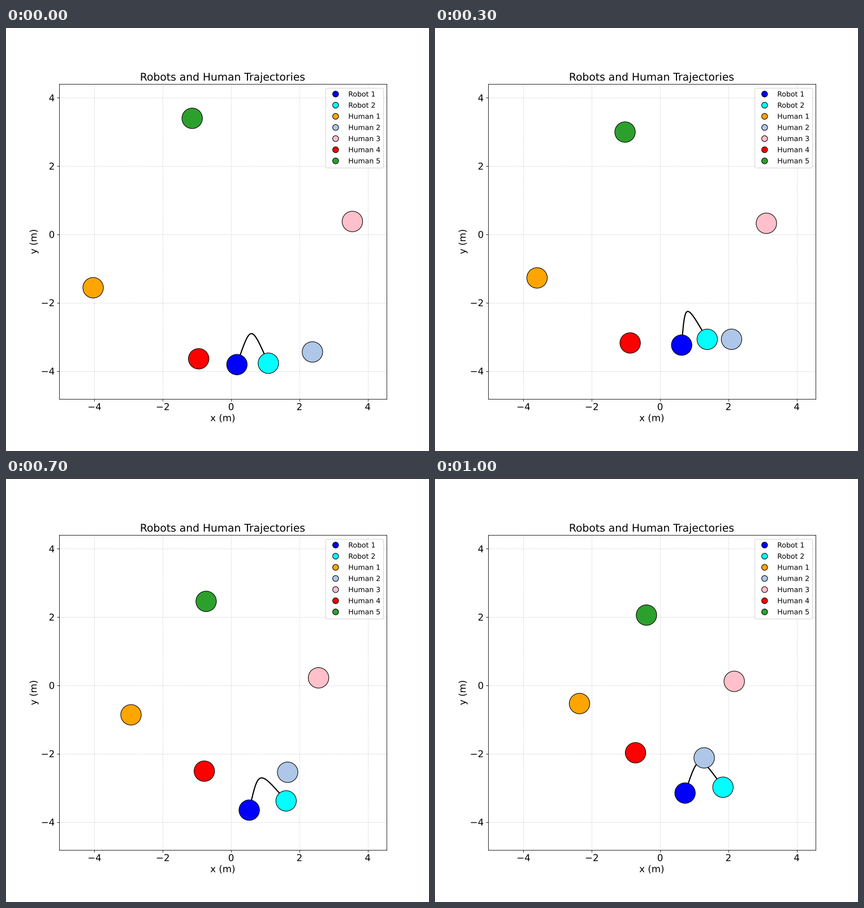
Recreate the animation shown at these times as a matplotlib script. Size 748 by 748 pixels, loop 1100 ms.

```python
import numpy as np
import matplotlib.pyplot as plt
from matplotlib.animation import FuncAnimation
from matplotlib.patches import Circle, FancyBboxPatch
from matplotlib.patheffects import Normal
from matplotlib.text import Text
from matplotlib.transforms import IdentityTransform

SIZE, DPI = 748, 74.8
STEPS, INTERVAL = 11, 100
RADIUS = 0.3
REACH = 1.0  # distance from each robot to the top of the rope

plt.rcParams["font.family"] = "DejaVu Sans"
plt.rcParams["text.hinting"] = "none"

# Robots drive straight between turning points (step, x, y).
ROBOTS = {
    "Robot 1": ("blue", [(0, 0.17, -3.81), (3, 0.63, -3.24), (5, 0.53, -3.72),
                         (7, 0.53, -3.65), (10, 0.73, -3.15)]),
    "Robot 2": ("cyan", [(0, 1.09, -3.77), (3, 1.38, -3.07), (5, 1.29, -3.06),
                         (7, 1.61, -3.38), (8, 1.84, -3.48), (10, 1.84, -2.98)]),
}

# Humans walk a gentle curve through start, halfway point and end.
HUMANS = {
    "Human 1": ("orange", [(-4.04, -1.56), (-3.28, -1.07), (-2.36, -0.53)]),
    "Human 2": ("#aec7e8", [(2.38, -3.44), (1.88, -2.81), (1.29, -2.12)]),
    "Human 3": ("pink", [(3.55, 0.38), (2.83, 0.28), (2.17, 0.12)]),
    "Human 4": ("red", [(-0.95, -3.64), (-0.83, -2.85), (-0.72, -1.97)]),
    "Human 5": ("#2ca02c", [(-1.14, 3.40), (-0.90, 2.73), (-0.40, 2.06)]),
}
COLORS = {name: color for name, (color, _) in {**ROBOTS, **HUMANS}.items()}


def drive(turns, step):
    t, x, y = np.transpose(turns)
    return np.array([np.interp(step, t, x), np.interp(step, t, y)])


def walk(points, step):
    s = step / (STEPS - 1)
    weights = [(1 - 2 * s) * (1 - s), 4 * s * (1 - s), s * (2 * s - 1)]
    return np.dot(weights, points)


def rope_curve(p, q, n=80):
    """Cubic Bezier with merged handles; its top is REACH from both ends."""
    chord = q - p
    span = np.hypot(*chord)
    height = np.sqrt(max(REACH**2 - (span / 2)**2, 0))
    normal = np.array([-chord[1], chord[0]]) / span
    w = np.linspace(-0.5, 0.5, n)
    return (((p + q) / 2)[:, None] + np.outer(chord, w * (0.75 + w**2))
            + np.outer(normal, height * (1 - 4 * w**2)))


def draw_legend(ax):
    em = 12 * DPI / 72
    px = IdentityTransform()
    left, right, top, bottom = 565.4, 667, 105.6, 247.2
    ax.add_artist(FancyBboxPatch(
        (left, SIZE - bottom), right - left, bottom - top,
        boxstyle="round,pad=0,rounding_size=0.2", mutation_scale=em,
        fc="white", ec="0.8", alpha=0.8, transform=px, snap=True, zorder=5))
    for i, (name, color) in enumerate(COLORS.items()):
        base = SIZE - 121.2 - 19.69 * i
        ax.add_artist(Circle((left + 1.4 * em, base + 0.35 * em), 5 * DPI / 72,
                             fc=color, ec="black", transform=px, zorder=6))
        ax.text(left + 3.2 * em, base, name, fontsize=12, transform=px, zorder=6)


fig, ax = plt.subplots(figsize=(SIZE / DPI, SIZE / DPI), dpi=DPI)
ax.set_aspect("equal")
ax.set_xlim(-5.043, 4.555)
ax.set_ylim(-4.82, 4.401)
ticks = range(-4, 5, 2)
ax.set_xticks(ticks)
ax.set_yticks(ticks)
ax.tick_params(labelsize=16)
ax.set_xlabel("x (m)", fontsize=16)
ax.set_ylabel("y (m)", fontsize=16)
ax.set_title("Robots and Human Trajectories", fontsize=18)
ax.grid(True, linestyle="--", alpha=0.5)
ax.set_axisbelow(True)
draw_legend(ax)

# Outline rendering keeps the text at sub-pixel positions.
for text in fig.findobj(Text):
    text.set_path_effects([Normal()])

rope, = ax.plot([], [], color="black", lw=2, zorder=2)
discs = [ax.add_patch(Circle((0, 0), RADIUS, fc=color, ec="black", zorder=3))
         for color in COLORS.values()]


def update(step):
    robots = [drive(turns, step) for _, turns in ROBOTS.values()]
    humans = [walk(points, step) for _, points in HUMANS.values()]
    for disc, center in zip(discs, robots + humans):
        disc.center = center
    rope.set_data(*rope_curve(*robots))
    return [rope, *discs]


anim = FuncAnimation(fig, update, frames=STEPS, interval=INTERVAL,
                     repeat=True, repeat_delay=0)
plt.show()
```
